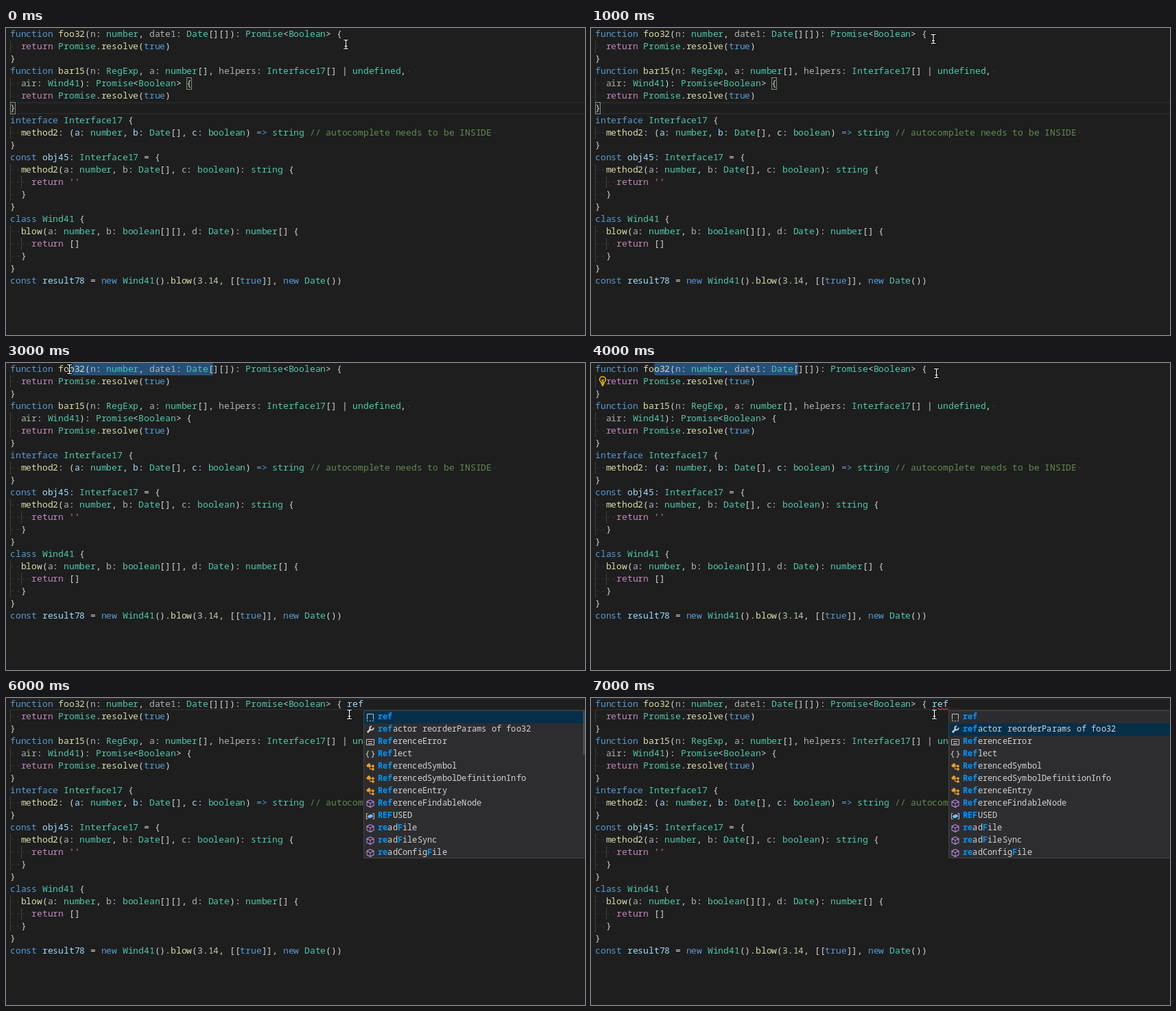
Write an HTML page that moves like this. It is 844 px wide and 448 px high and loops after 8 s.

```html
<!DOCTYPE html>
<html lang="en">
<head>
<meta charset="utf-8">
<title>Code editor</title>
<style>
  html, body { margin: 0; width: 100%; height: 100%; overflow: hidden; background: #1e1e1e; }
  svg { display: block; width: 844px; height: 448px; }
  text { font: 13px "Noto Sans Mono", "DejaVu Sans Mono", monospace; white-space: pre; }
  .menu text { font-size: 12px; fill: #d4d4d4; }
  .menu .hit { fill: #0097fb; font-weight: bold; }
</style>
</head>
<body>
<svg id="stage" viewBox="0 0 844 448" xmlns="http://www.w3.org/2000/svg"></svg>
<script>
const LEFT = 6, CHAR = 7.8, ROW = 18, STEP = 1000;
const FADED = '#b0b0b0';
const stage = document.getElementById('stage');

const code = `function foo32(n: number, date1: Date[][]): Promise<Boolean> {
  return Promise.resolve(true)
}
function bar15(n: RegExp, a: number[], helpers: Interface17[] | undefined,~
  air: Wind41): Promise<Boolean> {
  return Promise.resolve(true)
}
interface Interface17 {
  method2: (a: number, b: Date[], c: boolean) => string // autocomplete needs to be INSIDE~
}
const obj45: Interface17 = {
  method2(a: number, b: Date[], c: boolean): string {
    return ''
  }
}
class Wind41 {
  blow(a: number, b: boolean[][], d: Date): number[] {
    return []
  }
}
const result78 = new Wind41().blow(3.14, [[true]], new Date())`.replace(/~/g, ' ').split('\n');

const rules = [
  [/^\/\/.*\S/, '#608b4e'],
  [/^''/, '#ce9178'],
  [/^return\b/, '#c586c0'],
  [/^(function|interface|const|class|new|true)\b|^=>/, '#569cd6'],
  [/^(RegExp|Date|Promise|Boolean|Interface17|Wind41|number|string|boolean|undefined)\b/, '#4ec9b0'],
  [/^(foo32|bar15|method2|resolve|blow)\b/, '#dcdcaa'],
  [/^(obj45|result78|ref)\b/, '#9cdcfe'],
  [/^\d+\.\d+/, '#b5cea8'],
  [/^\w+(?=:)/, FADED],
  [/^\S/, '#d4d4d4']
];

const mouse = [[495.5, 24], [499, 16], [304.5, 26], [92.5, 9], [503.5, 15], [503.5, 19], [500.5, 24], [500.5, 24]];
const tail = ['', '', '', '', '', ' ', ' ref', ' ref'];

const esc = s => s.replace(/&/g, '&amp;').replace(/</g, '&lt;');
const colX = c => +(LEFT + c * CHAR).toFixed(2);
const rect = (x, y, w, h, fill, more = '') =>
  `<rect x="${x}" y="${y}" width="${w}" height="${h}" fill="${fill}" ${more}/>`;
const path = (d, stroke, width = 1, fill = 'none') =>
  `<path d="${d}" stroke="${stroke}" stroke-width="${width}" fill="${fill}"/>`;

// Glyphs sit on whole pixels of the monospace grid
const span = (word, left, advance, col, attr) => {
  const xs = [...word].map((_, i) => Math.round(left + (col + i) * advance));
  return `<tspan x="${xs.join(' ')}" ${attr}>${esc(word)}</tspan>`;
};

function codeLine(src, row) {
  const y = row * ROW;
  const indent = src.search(/\S/), end = src.trimEnd().length;
  let out = '', spans = '';
  for (let c = 0; c < indent; c += 2) out += rect(Math.round(colX(c)), y, 1, ROW, '#404040');
  for (let c = 0; c < src.length; c++) {
    if (c < indent || c >= end)
      out += `<circle cx="${colX(c + 0.5)}" cy="${y + 9}" r=".85" fill="#464646"/>`;
  }
  for (let c = indent; c < end;) {
    const rest = src.slice(c);
    if (rest[0] === ' ') { c++; continue; }
    let [re, fill] = rules.find(r => r[0].test(rest));
    const word = rest.match(re)[0];
    if (fill === FADED && src.includes('=>')) fill = '#9cdcfe';
    spans += span(word, LEFT, CHAR, c, `fill="${fill}"`);
    c += word.length;
  }
  return out + `<text y="${y + 13}">${spans}</text>`;
}

const lineMark = row =>
  rect(LEFT, row * ROW, 838, 2, '#282828') + rect(LEFT, row * ROW + 16, 838, 2, '#282828');

const bracket = (row, col) =>
  rect(Math.round(colX(col)) + 0.5, row * ROW + 0.5, 7, 17, 'rgba(0,100,0,.1)', 'stroke="#888"');

function beam([x, y]) {
  const d = `M${x - 3} ${y - 6.5}h2l1 1l1 -1h2M${x} ${y - 5.5}V${y + 5.5}` +
    `M${x - 3} ${y + 6.5}h2l1 -1l1 1h2M${x - 1.5} ${y + 2.5}h3`;
  return `<g stroke-linecap="square">${path(d, '#000', 3)}${path(d, '#fff', 1.2)}</g>`;
}

const bulb = () => rect(9, 19, 13, 16, '#1e1e1e') +
  path('M15 29.5V28C11 25.5 12.3 19.8 17 19.8S23 25.5 19 28V29.5ZM15 31.5h4M16 33.2h2M15.3 24.3l1.7 1.5l1.7 -1.5M17 26v3', '#fc0', 1.3);

// Icons are drawn around the centre of a 12px cell
const icons = {
  snippet: path('M-4.5 3.5V-4.5H4.5V3.5M-5 5.5h2M-1 5.5h2M3 5.5h2', '#c5c5c5', 1),
  wrench: path('M-4.2 4.2L1 -1', '#c5c5c5', 2.8) +
    path('M4.6 -2.6A2.7 2.7 0 1 1 2 -4.8', '#c5c5c5', 2),
  constant: path('M-5.5 -3.5H5.5V4.5H-5.5ZM-3 -.5h6M-3 2.5h6', '#c5c5c5', 1),
  braces: path('M-2 -4.5Q-4 -4.5 -4 -2.5T-5.3 0Q-4 .4 -4 2.5T-2 4.5M2 -4.5Q4 -4.5 4 -2.5T5.3 0Q4 .4 4 2.5T2 4.5', '#c5c5c5', 1.2),
  cls: path('M-6 -1.2L-2 -5.2L1 -2.2L-3 1.8ZM3.8 -3L6.3 -.5L4 1.8L1.5 -.7ZM3.8 1.5L6.3 4L4 6.3L1.5 3.8Z', 'none', 0, '#ee9d28') +
    path('M-1 -.5H3M-.5 -.5V3.8H3', '#ee9d28', 1.1),
  cube: path('M0 -5.3L5 -2.8V2.8L0 5.5L-5 2.8V-2.8ZM-5 -2.8L0 -.3L5 -2.8M0 -.3V5.5', '#b180d7', 1.1),
  variable: path('M-3.5 -3.5H-5.5V4.5H-3.5M3.5 -3.5H5.5V4.5H3.5', '#c5c5c5', 1) +
    path('M-3.8 -.2L1.2 -2.6L3.8 -1V1.4L-1.2 3.6L-3.8 2Z', 'none', 0, '#75beff')
};

// Matched letters stand in brackets
const items = [
  ['snippet', '[ref]'], ['wrench', '[ref]actor reorderParams of foo32'],
  ['constant', '[Ref]erenceError'], ['braces', '[Ref]lect'],
  ['cls', '[Ref]erencedSymbol'], ['cls', '[Ref]erencedSymbolDefinitionInfo'],
  ['cls', '[Ref]erenceEntry'], ['cube', '[Ref]erenceFindableNode'],
  ['variable', '[REF]USED'], ['cube', '[re]ad[F]ile'],
  ['cube', '[re]ad[F]ileSync'], ['cube', '[re]adConfig[F]ile']
];

function menu(active, scrollbar) {
  let out = rect(521.5, 18.5, 330, 215, '#2d2d30', 'stroke="#454545"') +
    rect(522, 19 + active * ROW, 322, ROW, '#062f4a');
  items.forEach(([icon, label], i) => {
    const y = 19 + i * ROW;
    let col = 0, spans = '';
    label.split(/[\[\]]/).forEach((part, k) => {
      if (!part) return;
      spans += span(part, 542, 7.2, col, k % 2 ? 'class="hit"' : '');
      col += part.length;
    });
    out += `<g transform="translate(531 ${y + 9})">${icons[icon]}</g><text y="${y + 12}">${spans}</text>`;
  });
  if (scrollbar) out += rect(841, 19, 3, 64, 'rgba(121,121,121,.4)');
  return `<g class="menu">${out}</g>`;
}

function squiggle(x0, x1) {
  let d = `M${x0} 17.3`;
  for (let x = x0 + 3, up = true; x <= x1; x += 3, up = !up) d += `L${x} ${up ? 15.2 : 17.3}`;
  return path(d, '#f14c4c', 1);
}

function scene(n) {
  const selected = n === 3 || n === 4;
  let out = rect(0, 0, 844, 448, '#1e1e1e');
  if (n < 2) out += lineMark(6) + bracket(4, 33) + bracket(6, 0);
  else if (!selected) out += lineMark(0);
  if (n === 2) out += bracket(0, 61) + bracket(2, 0);
  if (selected) out += rect(colX(11), 0, 27 * CHAR, ROW, '#264f78', 'rx="3"');
  code.forEach((line, i) => { out += codeLine(i ? line : line + tail[n], i); });
  if (n === 4) out += bulb();
  if (n === 5) out += rect(498, 0, 2, ROW, '#aeafad');
  if (n === 7) out += squiggle(497, 521);
  if (n > 5) out += menu(n - 6, n === 6);
  return out + beam(mouse[n]);
}

let shown = -1;
function draw(now) {
  const n = Math.floor(now / STEP) % mouse.length;
  if (n !== shown) stage.innerHTML = scene(shown = n);
}
const start = performance.now();
function tick() {
  draw(performance.now() - start);
  requestAnimationFrame(tick);
}
tick();
</script>
</body>
</html>
```
